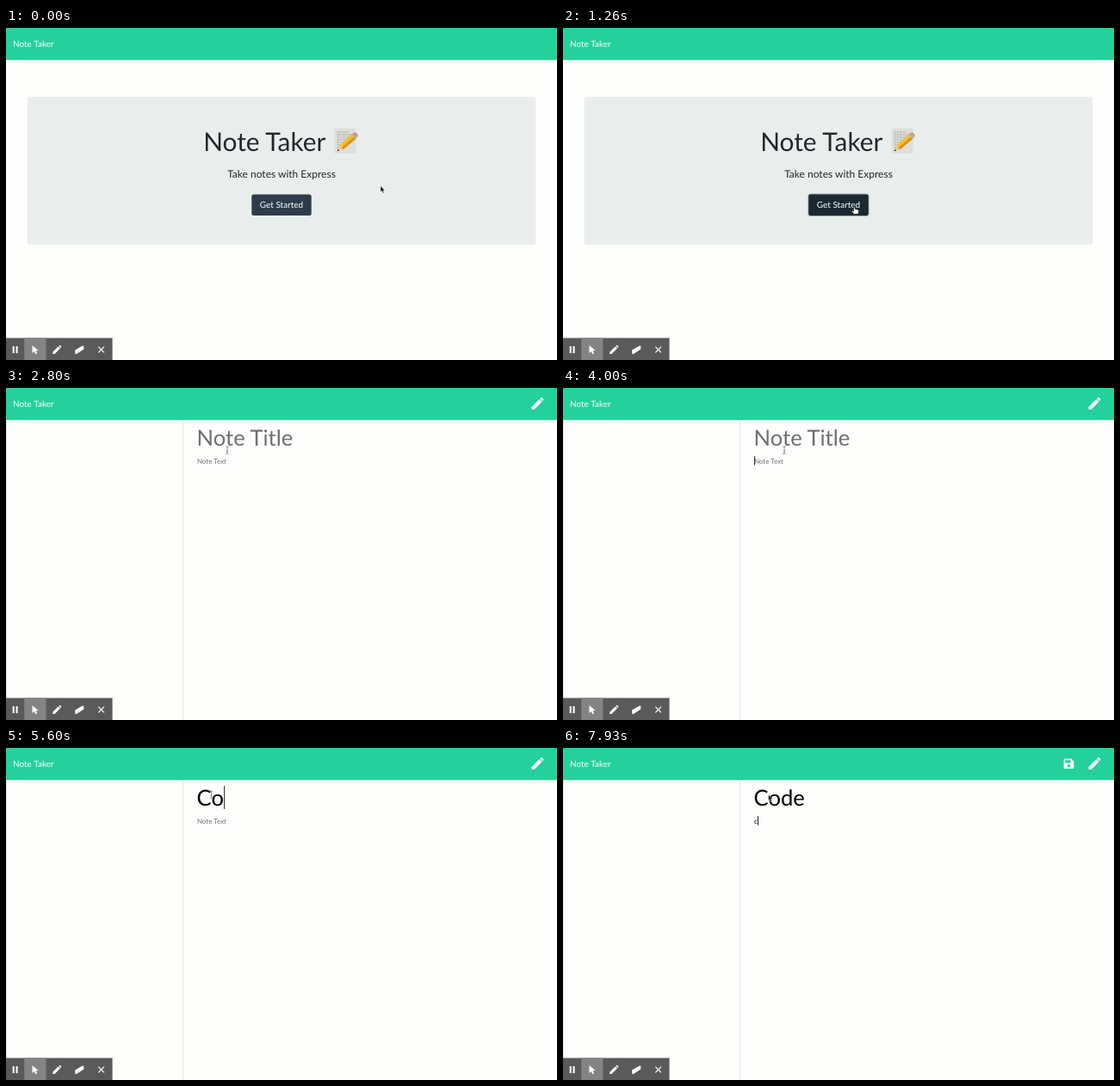
Write an HTML page that moves like this. It is 640 by 386 pixels and loops after 8000 ms.

```html
<!DOCTYPE html>
<html lang="en">
<head>
<meta charset="utf-8">
<title>Note Taker</title>
<style>
  html, body { margin: 0; width: 100%; height: 100%; overflow: hidden; background: #fdfefc; }
  svg { display: block; width: 640px; height: 386px; font-family: Lato, sans-serif; }
  text { white-space: pre; text-rendering: geometricPrecision; }
  .title { font-size: 25.6px; }
  .body { font-size: 8px; }
  .hint { fill: #6f706f; }
  .white { fill: #fff; }
  .hidden { visibility: hidden; }
</style>
</head>
<body>
<svg viewBox="0 0 640 386">
  <defs>
    <g id="pencil">
      <path d="M-6.5 6.5V3.3L2.4-5.6 5.5-2.5-3.4 6.5Z"/>
      <path d="M3.2-6.4 4.4-7.5Q5.1-8 5.8-7.4L7.1-6Q7.6-5.3 7.1-4.6L6.2-3.4Z"/>
    </g>
  </defs>

  <rect width="640" height="386" fill="#fdfefc"/>
  <rect width="640" height="37.3" fill="#24d09b"/>
  <text class="white" x="8" y="22.1" font-size="10">Note Taker</text>

  <g id="home">
    <rect x="24.6" y="80" width="590.8" height="171.8" rx="2.5" fill="#e9eeec"/>
    <text x="229.2" y="142.6" font-size="29.87" fill="#20272c">Note Taker</text>
    <g id="memo">
      <rect x="381.6" y="116.8" width="25" height="29" rx=".6" fill="#dededa"/>
      <path d="M384.5 121H398M384.5 124H402M384.5 127H401M384.5 130H397M384.5 133H394M384.5 136H391M384.5 139H388"
            stroke="#a5a5a2" stroke-width="1" stroke-dasharray="3 .8 2 .7"/>
      <path d="M384.5 143.3 387.6 136.6 391.5 141.3Z" fill="#e9c99b"/>
      <path d="M384.5 143.3 385.6 140.8 387.1 142.5Z" fill="#333"/>
      <path d="M387.6 136.6 401.4 123.8 406 128.9 391.5 141.3Z" fill="#f6bd2c"/>
      <path d="M389.8 139.2 404.1 126.8 406 128.9 391.5 141.3Z" fill="#dc8f1d"/>
      <path d="M401.4 123.8 403.4 122 408 127.1 406 128.9Z" fill="#a9b1b1"/>
      <path d="M403.4 122Q405.4 120.6 407.5 122.7T408 127.1Z" fill="#e5857c"/>
    </g>
    <text x="320" y="173.7" font-size="12" text-anchor="middle" fill="#20272c">Take notes with Express</text>
    <rect id="glow" x="284.4" y="192.6" width="71.2" height="26.4" rx="3.4" fill="#9aa5ac"/>
    <rect id="button" x="285.3" y="193.5" width="69.4" height="24.6" rx="2.5"/>
    <text class="white" x="320" y="209.4" font-size="10" text-anchor="middle">Get Started</text>
  </g>

  <g id="notes">
    <path d="M.4 37.3V386M205.5 37.3V386" stroke="#dfe2df" stroke-width=".9"/>
    <use href="#pencil" x="617" y="18.6" fill="#f4fffb"/>
    <g id="save">
      <path d="M583 12.6H590.3L593.4 15.7V22.7Q593.4 24.1 592 24.1H583Q581.6 24.1 581.6 22.7V14Q581.6 12.6 583 12.6Z" fill="#f4fffb"/>
      <path d="M583.2 14.2H589.6V17.3H583.2Z" fill="#24d09b"/>
      <circle cx="587.5" cy="20.7" r="1.7" fill="#24d09b"/>
    </g>
    <text id="title" class="title" x="221.6" y="66.7"></text>
    <text id="body" class="body" x="221.9" y="87.6"></text>
    <rect id="titleCaret" y="44" width=".9" height="27"/>
    <rect id="bodyCaret" y="79.3" width=".9" height="10.4"/>
  </g>

  <g id="toolbar">
    <rect y="360.4" width="123.6" height="25.6" fill="#595a59"/>
    <rect x="21.3" y="360.4" width="25.2" height="25.6" fill="#838483"/>
    <path d="M7.7 370H9.7V378H7.7ZM11.6 370H13.6V378H11.6Z" class="white"/>
    <path d="M30.5 369V378L32.8 376.1 34.4 379.3 36 378.5 34.6 375.3 37.7 375Z" class="white"/>
    <use href="#pencil" class="white" transform="translate(59 374.4) scale(.72)"/>
    <path d="M80.2 374.6 88.2 369.8 90.3 369.6V373.4L82.3 378.7 80.2 379.1Z" class="white"/>
    <path d="M107.4 370.7 114 377.3M114 370.7 107.4 377.3" stroke="#fff" stroke-width="1.2"/>
  </g>

  <g id="pointer">
    <circle id="ring" r="16.8" fill="none" stroke="#e2506c" stroke-opacity=".85" stroke-width="2"/>
    <path id="arrow" d="M0 0V7.2L1.7 5.8 2.9 8.5 4.2 7.9 3 5.4H5.2Z" fill="#111" stroke="#fff" stroke-width=".5"/>
    <path id="hand" d="M-.9 0Q0-.9 .7 0L1.1 2.6 2.6 2.7 4.8 3.5Q5.6 4.2 5.3 5.8L4.4 8.5H-.2L-2.9 5.2Q-3.1 4 -1.9 4.2L-.6 5.2Z"
          fill="#fff" stroke="#222" stroke-width=".8" stroke-linejoin="round"/>
    <path id="beam" d="M-1.7-4.2Q0-4.2 0-3Q0-4.2 1.7-4.2M0-3V3.4M-1.7 4.6Q0 4.6 0 3.4Q0 4.6 1.7 4.6M-1 1.5H1"
          fill="none" stroke="#666" stroke-width=".7"/>
  </g>
</svg>
<script>
const LOOP = 8000;
const el = id => document.getElementById(id);
const within = (t, ...spans) => spans.some(([from, to]) => t >= from && t < to);
const show = (id, on) => el(id).classList.toggle('hidden', !on);
const ease = p => p * p * (3 - 2 * p);

// Pointer moves: start time, end time, from, to
const moves = [
  [0, 820, [435, 183.5], [338.2, 208]],
  [2340, 2800, [338.2, 208], [257, 72]],
  [4540, 5000, [257, 72], [238.5, 54]]
];
const titleKeys = [5400, 5600, 5730, 5930];
const bodyKeys = [7800];

function pointerAt(t) {
  const [start, end, a, b] = moves.filter(m => t >= m[0]).pop();
  const p = ease(Math.min(1, (t - start) / (end - start)));
  return a.map((v, i) => v + (b[i] - v) * p);
}

function setField(id, typed, hint) {
  const field = el(id);
  const text = typed || hint;
  if (field.textContent !== text) field.textContent = text;
  field.classList.toggle('hint', !typed);
  const width = typed ? field.getComputedTextLength() : 0;
  el(id + 'Caret').setAttribute('x', field.x.baseVal[0].value + width + .3);
}

const typedAt = (word, keys, t) => word.slice(0, keys.filter(k => t >= k).length);

function render(t) {
  const home = t < 1460;
  const [x, y] = pointerAt(t);
  const overButton = home && x < 354 && y > 193;
  const pressed = within(t, [860, 1460]);

  el('home').style.display = home ? '' : 'none';
  el('notes').style.display = home ? 'none' : '';
  el('button').setAttribute('fill', pressed ? '#1b2831' : overButton ? '#202e3a' : '#2c3c4b');
  show('glow', pressed);

  setField('title', typedAt('Code', titleKeys, t), 'Note Title');
  setField('body', typedAt('c', bodyKeys, t), 'Note Text');
  show('titleCaret', within(t, [5060, 6460]));
  show('bodyCaret', within(t, [3000, 3460], [4000, 4600], [7000, 7530], [7800, LOOP]));
  show('save', t >= 7860);

  const arrow = (home && !overButton) || t >= 6930;
  const hand = overButton || within(t, [1460, 2390]);
  el('pointer').setAttribute('transform', `translate(${x} ${y})`);
  show('arrow', arrow);
  show('hand', hand);
  show('beam', !arrow && !hand);
  show('ring', within(t, [860, 1000], [3000, 3130], [5060, 5260]));
}

let origin;
function tick(now) {
  origin ??= now;
  render((now - origin) % LOOP);
  requestAnimationFrame(tick);
}
render(0);
requestAnimationFrame(tick);
</script>
</body>
</html>
```
